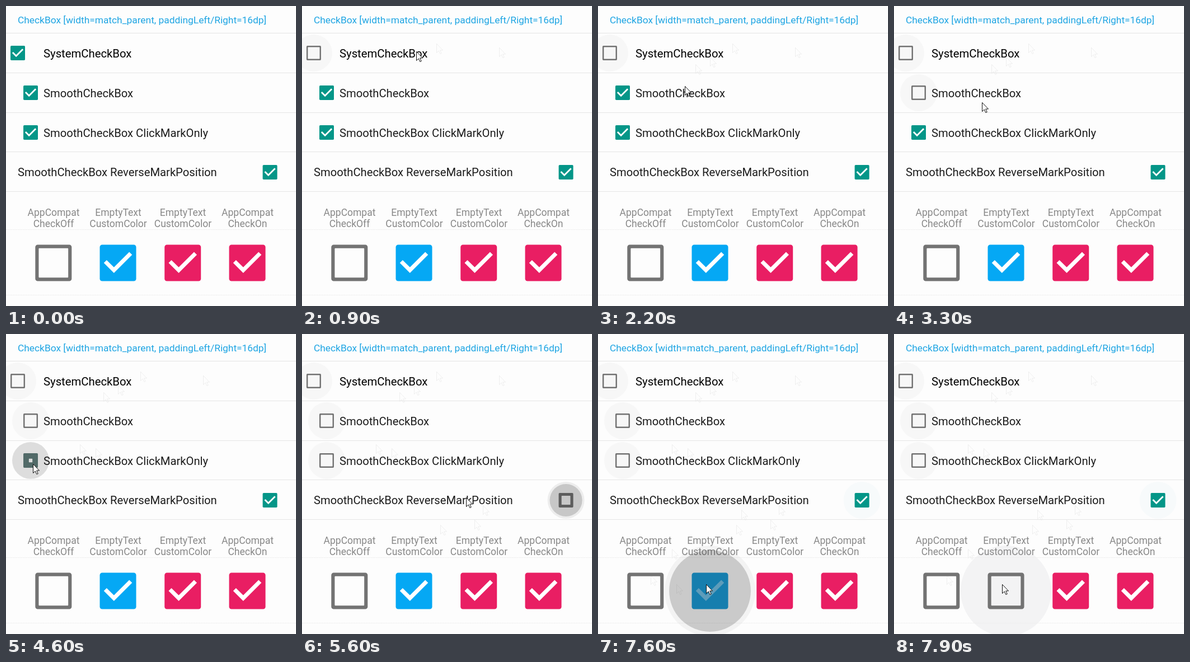
Recreate the animation shown at these times as an HTML page. Size 518 px wide and 536 px high, loop 8 s.

```html
<!DOCTYPE html>
<html lang="en">
<head>
<meta charset="utf-8">
<style>
  html, body { margin: 0; height: 100%; overflow: hidden; background: #fdfdfd; }
  svg { display: block; font-family: Roboto, sans-serif; }
  .label { font-size: 20.2px; fill: #1c1c1c; }
  .caption { font-size: 17.5px; fill: #888; text-anchor: middle; }
</style>
</head>
<body>
<svg width="518" height="536" viewBox="0 0 518 536">
  <defs>
    <path id="arrow" d="M.5.5V16.5L4.2 13 6.8 18.5 9.2 17.5 6.7 12H11.5Z"/>
    <path id="tick" d="M10 17 5 12 6.41 10.59 10 14.17 17.59 6.58 19 8Z" transform="translate(-12 -12)"/>
  </defs>
  <g id="under"></g>
  <g id="rules" fill="none" stroke="#e5e5e5"></g>
  <text x="21" y="31" font-size="17.35" fill="#1ea5e3">CheckBox [width=match_parent, paddingLeft/Right=16dp]</text>
  <g class="label">
    <text x="67" y="92" font-size="20.3" fill="#000">SystemCheckBox</text>
    <text x="67" y="163">SmoothCheckBox</text>
    <text x="67" y="234">SmoothCheckBox ClickMarkOnly</text>
    <text x="21" y="304">SmoothCheckBox ReverseMarkPosition</text>
  </g>
  <g class="caption" id="captions"></g>
  <g id="over"></g>
</svg>
<script>
const LOOP = 8000, STEP = 100;
const GREY = [115, 115, 115], TEAL = [4, 150, 136], BLUE = [5, 168, 244], PINK = [233, 30, 99];
const get = id => document.getElementById(id);

// Poses of a toggling box: [tone, hole, tick, ripple size, ripple opacity]
const OFF = [[1, 0, 1, .6, .1], [.8, 0, .4, .9, .17], [.2, .3, 0, 1, .09], [0, 1, 0, 0, 0]];
const ON = [[0, .75, 0, .88, .16], [.7, 0, .2, 1, .12], [1, 0, 1, 0, 0]];

// Clicks are [step, poses]
const boxes = [
  { x: 21, y: 84, half: 13, color: TEAL, clicks: [[6, OFF], [11, ON], [17, OFF]] },
  { x: 44, y: 155, half: 13, color: TEAL, clicks: [[29, OFF]] },
  { x: 44, y: 226, half: 13, color: TEAL, clicks: [[44, OFF]] },
  { x: 471.5, y: 297, half: 13, color: TEAL, clicks: [[52, OFF], [56, ON]] },
  { x: 84.8, y: 459, half: 32.5, color: GREY, clicks: [[-9, OFF]], still: true },
  { x: 200, y: 459, half: 32.5, color: BLUE, clicks: [[75, OFF]] },
  { x: 315.7, y: 459, half: 32.5, color: PINK, clicks: [] },
  { x: 431, y: 459, half: 32.5, color: PINK, clicks: [] }
];

// Pointer stops: [step, x, y, leaves a faint trace]
const pointer = [
  [1, 352, 74, 1], [2, 240, 67, 1], [3, 204, 81], [14, 200, 91, 1], [21, 174, 104, 1], [22, 155, 143],
  [33, 157, 172], [34, 160, 204, 1], [35, 155, 223], [39, 132, 197, 1], [40, 62, 228], [42, 48, 232],
  [47, 247, 341, 1], [48, 308, 332, 1], [49, 323, 306, 1], [50, 293, 292],
  [59, 256, 314, 1], [60, 196, 355], [61, 132, 384, 1], [62, 94, 431, 1], [63, 106, 450],
  [66, 140, 447, 1], [67, 165, 445], [68, 178, 446], [70, 186, 446], [72, 193, 447]
];

function stateOf(box, step) {
  const past = box.clicks.filter(c => c[0] <= step);
  if (!past.length) return { pose: OFF[0], busy: false, used: false };
  const [start, poses] = past[past.length - 1];
  const k = Math.min(step - start, poses.length - 1);
  const busy = k < poses.length - 1;
  return { pose: poses[k], busy, used: !box.still && (!busy || past.length > 1) };
}

const disc = (b, r, fill, opacity = 1) =>
  `<circle cx="${b.x}" cy="${b.y}" r="${r}" fill="${fill}" opacity="${opacity}"/>`;

const rippleRadius = b => b.half > 20 ? 81 : 33;

function halo(b, { pose, used }) {
  if (!used) return '';
  return disc(b, rippleRadius(b), b.half > 20 ? '#f3f3f4' : pose[0] ? '#f7fafb' : '#f7f7f7');
}

function square(h, r) {
  const s = 2 * (h - r);
  return `M${r - h} ${-h}h${s}a${r} ${r} 0 0 1 ${r} ${r}v${s}a${r} ${r} 0 0 1 ${-r} ${r}` +
    `h${-s}a${r} ${r} 0 0 1 ${-r} ${-r}v${-s}a${r} ${r} 0 0 1 ${r} ${-r}z`;
}

function checkBox(b, { pose: [tone, hole, tick, size, alpha], busy }) {
  const unit = b.half / 9, inner = (b.half - 1.7 * unit) * hole;
  const color = GREY.map((g, i) => Math.round(g + (b.color[i] - g) * tone));
  const gap = inner ? square(inner, Math.min(inner, unit * .3)) : '';
  let out = `<g transform="translate(${b.x} ${b.y})">` +
    `<path fill="rgb(${color})" fill-rule="evenodd" d="${square(b.half, unit * 1.2)}${gap}"/>` +
    `<use href="#tick" fill="#fff" opacity="${tick}" transform="scale(${unit})"/></g>`;
  if (busy) {
    const r = rippleRadius(b);
    out += disc(b, r, '#000', .04) + disc(b, r * size, '#000', alpha);
  }
  return out;
}

const arrow = ([, x, y], style) => `<use href="#arrow" x="${x}" y="${y}" ${style}/>`;

function draw(step) {
  const states = boxes.map(b => stateOf(b, step));
  const stops = pointer.filter(p => p[0] <= step);
  const current = stops.pop();
  get('under').innerHTML =
    stops.filter(p => p[3]).map(p => arrow(p, 'fill="none" stroke="#000" opacity=".06"')).join('') +
    boxes.map((b, i) => halo(b, states[i])).join('');
  get('over').innerHTML = boxes.map((b, i) => checkBox(b, states[i])).join('') +
    (current ? arrow(current, 'fill="#fff" stroke="#111"') : '');
}

get('rules').innerHTML = [48, 119, 190, 260, 331].map(y => `<path d="M0 ${y + .5}H518"/>`).join('') +
  [400, 517].map(y => `<path stroke="#ececec" stroke-dasharray="2 1" d="M0 ${y - .5}H518"/>`).join('');

get('captions').innerHTML = [
  [85, 'AppCompat', 'CheckOff'], [200.5, 'EmptyText', 'CustomColor'],
  [316, 'EmptyText', 'CustomColor'], [431.5, 'AppCompat', 'CheckOn']
].map(([x, top, bottom]) => `<text x="${x}" y="374.5">${top}</text><text x="${x}" y="395">${bottom}</text>`).join('');

let shown = -1;
function tick() {
  const step = Math.floor(performance.now() % LOOP / STEP);
  if (step !== shown) draw(shown = step);
  requestAnimationFrame(tick);
}
tick();
</script>
</body>
</html>
```
